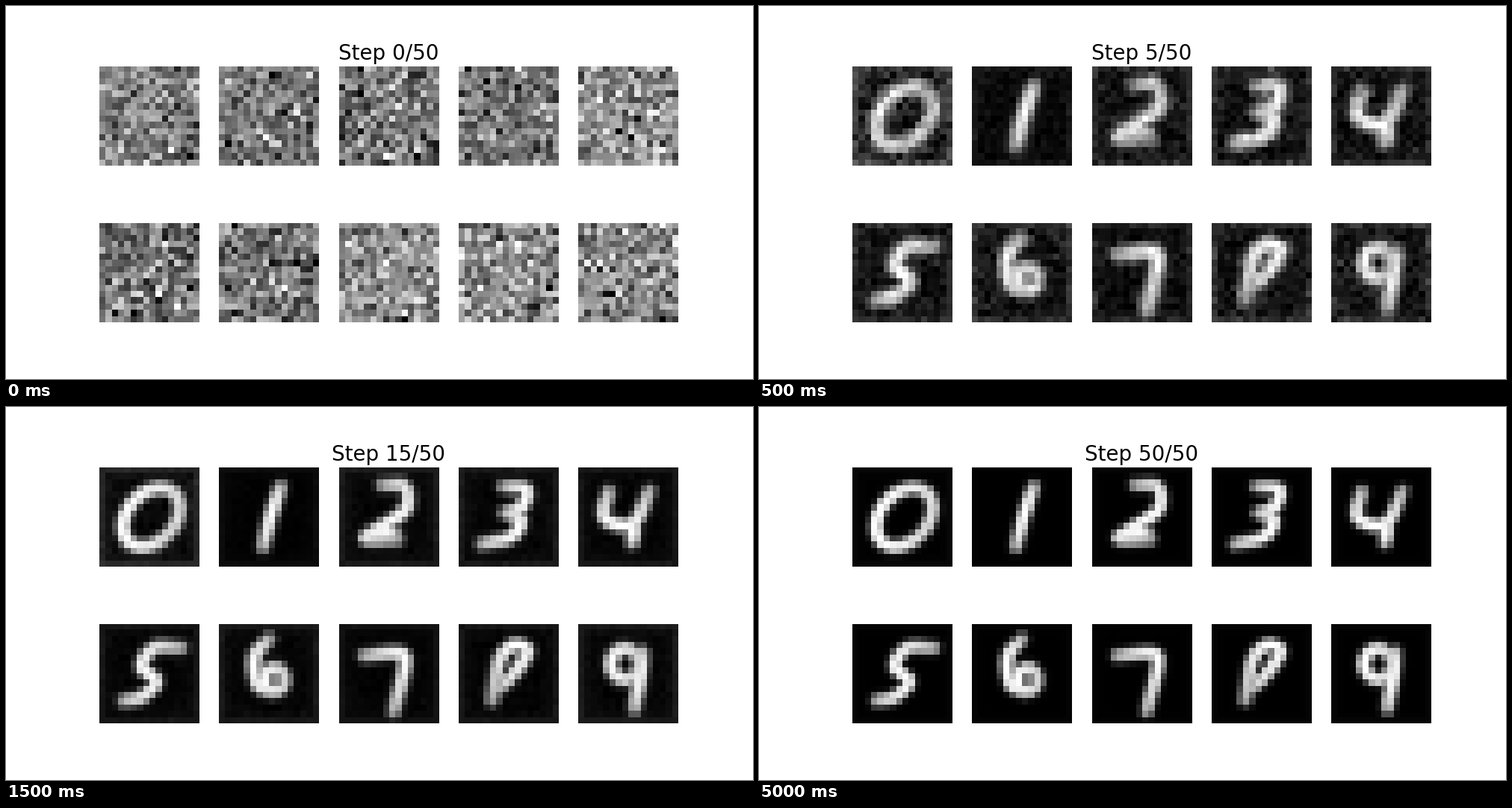
A matplotlib script that plays this animation: 1000 px wide and 500 px high, repeating every 5100 ms.

```python
import numpy as np
import matplotlib.pyplot as plt
from matplotlib.animation import FuncAnimation

STEPS = 50
SIZE = 16
INTERVAL = 100


def curve(*knots, samples=12):
    """Smooth pen stroke through (x, y) knots, paler towards its ends."""
    k = np.array(knots, float)
    k = np.vstack([2 * k[0] - k[1], k, 2 * k[-1] - k[-2]])
    u = np.linspace(0, 1, samples, endpoint=False)[:, None]
    parts = [b + 0.5 * u * (c - a + u * (2 * a - 5 * b + 4 * c - d
                                         + u * (3 * (b - c) + d - a)))
             for a, b, c, d in zip(k, k[1:], k[2:], k[3:])]
    path = np.vstack(parts + [k[-2:-1]])
    along = np.linspace(0, np.pi, len(path))
    return np.column_stack([path, 0.6 + 0.35 * np.sqrt(np.abs(np.sin(along)))])


def loop(cx, cy, rx, ry, tilt=0):
    """Closed elliptic pen stroke, a little brighter on its left side."""
    t = np.linspace(0, 2 * np.pi, 48, endpoint=False)
    x, y, a = rx * np.cos(t), ry * np.sin(t), np.radians(tilt)
    dx = x * np.cos(a) - y * np.sin(a)
    dy = x * np.sin(a) + y * np.cos(a)
    return np.column_stack([cx + dx, cy + dy, 0.86 - 0.08 * dx / rx])


zero = loop(8.3, 8.1, 5.3, 3.8, tilt=-48)
one = curve((9.9, 3.2), (8.4, 7.5), (7.1, 12.8))
two = np.vstack([
    curve((6.9, 2.9), (10.4, 3.2), (10.7, 6.7), (6.8, 9.6), (4.3, 11.5),
          (9.3, 11.6)),
    curve((5, 11), (9, 10.4))])
three = np.vstack([
    curve((7.2, 3.2), (10.8, 3.7), (9.9, 6.6), (7.4, 7.4)),
    curve((7.4, 7.4), (9.9, 8.4), (8.4, 11.2), (3.7, 12.4))])
four = np.vstack([
    curve((4.9, 4), (4.1, 7.8), (6.8, 9.4), (9.3, 8.5), (11.4, 3.9)),
    curve((9, 8.8), (8.6, 12.2))])
five = curve((13.1, 3.9), (8.9, 3.9), (6.8, 6.8), (9, 9.3), (6.7, 11.8),
             (3.9, 12.4))
six = np.vstack([
    curve((8, 2.5), (5.7, 5.4), (6.2, 9.7), (8.5, 11.1)),
    loop(8.9, 9, 1.6, 1.8)])
seven = curve((4, 5.2), (9.6, 4.8), (10.5, 7), (8.7, 14))
eight = curve((5.4, 12.3), (6.5, 6), (8.8, 3.5), (11, 4.6), (8.5, 8.4),
              (6.2, 10.5))
nine = np.vstack([
    loop(7.5, 6.5, 2.2, 2.4),
    curve((10.3, 4.6), (10, 8), (9, 13.6))])
digits = [zero, one, two, three, four, five, six, seven, eight, nine]

centers = np.arange(SIZE) + 0.5
gx, gy = np.meshgrid(centers, centers)
inset = np.minimum(np.minimum(gx, SIZE - gx), np.minimum(gy, SIZE - gy)) - 0.5
edge = np.exp(-inset / 0.8)
distance = [np.hypot(gx[..., None] - d[:, 0], gy[..., None] - d[:, 1])
            for d in digits]


def draw_ink(i, blur):
    radius, soft = 1 + 0.25 * blur, 0.24 + 0.25 * blur
    coverage = 1 / (1 + np.exp((distance[i] - radius) / soft))
    return (digits[i][:, 2] * coverage).max(axis=2)


# Digits with more ink come out of the noise with a stronger haze.
amount = np.array([draw_ink(i, 0).mean() for i in range(len(digits))])
haze = (amount / amount.mean()) ** 1.3


def noise(*seed):
    return np.random.default_rng(seed).standard_normal((SIZE, SIZE))


def sample(i, step):
    """Picture of digit i after the given number of denoising steps."""
    start = noise(i)
    if step == 0:
        return start
    ink = (1 - np.exp(-2 * step)) * draw_ink(i, np.exp(-step / 8))
    glow = 0.12 * np.exp(-step / 10) * np.tanh(distance[i].min(axis=2) / 4)
    border = 0.12 * np.exp(-step / 25) * edge
    sigma = np.exp(-step) + 0.1 * haze[i] * np.exp(-step / 6)
    grain = sigma * (0.6 * start + 0.8 * noise(i, step))
    return np.abs(ink + haze[i] * (glow + border) + grain)


plt.rcParams["font.family"] = "DejaVu Sans"
fig, axes = plt.subplots(2, 5, figsize=(10, 5), dpi=100)
images = []
for i, ax in enumerate(axes.flat):
    images.append(ax.imshow(sample(i, 0), cmap="gray"))
    ax.axis("off")
title = axes[0, 2].set_title(f"Step 0/{STEPS}", fontsize=20)


def update(step):
    for i, image in enumerate(images):
        image.set_data(sample(i, step))
        image.autoscale()
    title.set_text(f"Step {step}/{STEPS}")
    return [*images, title]


anim = FuncAnimation(fig, update, frames=STEPS + 1, interval=INTERVAL,
                     repeat=True, repeat_delay=0)
plt.show()
```
